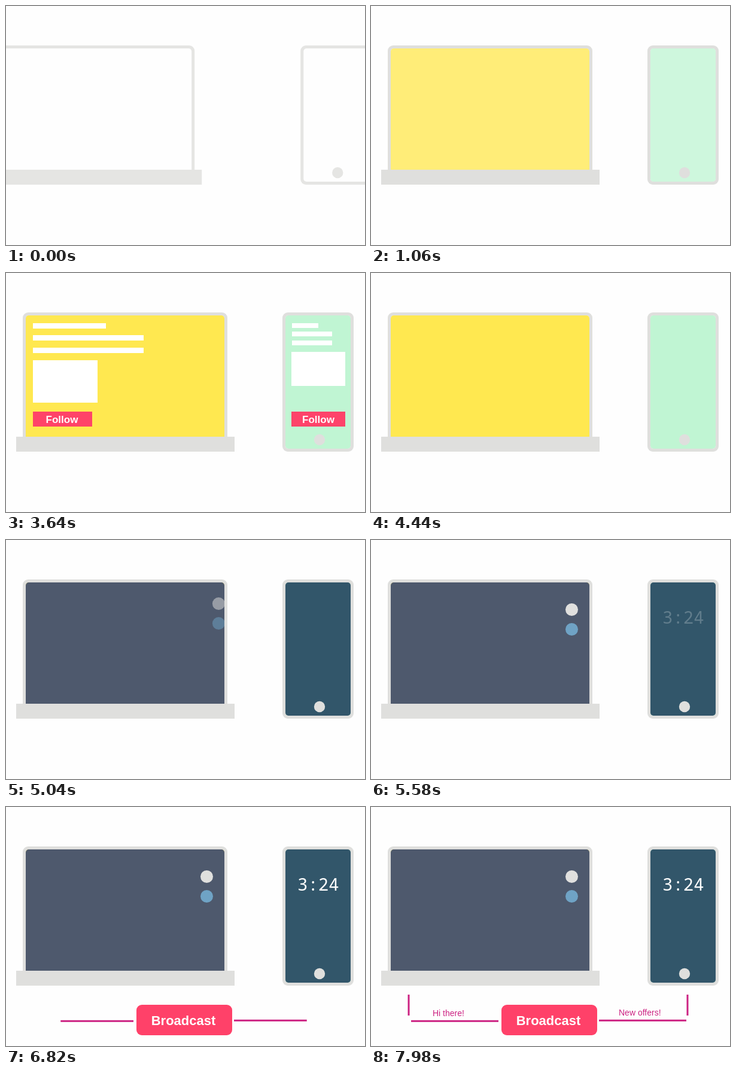
An HTML page with a canvas that plays this animation: 600 by 400 pixels, repeating every 8000 ms.

```html
<!DOCTYPE html>
<html lang="en">
<head>
<meta charset="utf-8">
<title>Devices</title>
<style>
html, body { margin: 0; width: 100%; height: 100%; overflow: hidden; background: #fefefe; }
canvas { display: block; width: 600px; height: 400px; }
</style>
</head>
<body>
<canvas id="stage" width="600" height="400"></canvas>
<script>
const ctx = document.getElementById('stage').getContext('2d');
const LOOP = 8000;
const PAPER = '#fefefe', GREY = '#dfdfdd', PINK = '#ff4169', MAGENTA = '#cc2282';
const SANS = '"Liberation Sans", Arial, sans-serif';
const MONO = '"Noto Sans Mono", "DejaVu Sans Mono", monospace';

const laptop = {
  inner: [33, 71, 332, 203, [5, 5, 0, 0]],
  day: '#ffe850', night: '#4e596d',
  blocks: [[45, 84, 122, 9], [45, 104, 185, 9], [45, 125, 185, 9], [45, 146, 108, 71]],
  button: [45, 232, 99, 25], label: 93.5
};
const phone = {
  inner: [467, 71, 109, 223, 5],
  day: '#c0f5d3', night: '#32566a',
  blocks: [[478, 84, 44, 8], [478, 98, 67, 8], [478, 113, 67, 8], [477, 132, 90, 57]],
  button: [477, 232, 90, 25], label: 522
};

const ramp = (t, from, to) => Math.min(1, Math.max(0, (t - from) / (to - from)));
const smooth = (t, from, to) => {
  const p = ramp(t, from, to);
  return p * p * (3 - 2 * p);
};
const easeOut = (t, from, to) => 1 - (1 - ramp(t, from, to)) ** 3;

function rect(x, y, w, h, color, alpha = 1) {
  ctx.globalAlpha = alpha;
  ctx.fillStyle = color;
  ctx.fillRect(x, y, w, h);
}

function rounded(x, y, w, h, r, color, alpha = 1) {
  ctx.globalAlpha = alpha;
  ctx.fillStyle = color;
  ctx.beginPath();
  ctx.roundRect(x, y, w, h, r);
  ctx.fill();
}

function disc(x, y, r, color, alpha = 1) {
  ctx.globalAlpha = alpha;
  ctx.fillStyle = color;
  ctx.beginPath();
  ctx.arc(x, y, r, 0, Math.PI * 2);
  ctx.fill();
}

function text(str, x, y, font, color, alpha, align = 'center') {
  ctx.globalAlpha = alpha;
  ctx.fillStyle = color;
  ctx.font = font;
  ctx.textAlign = align;
  ctx.fillText(str, x, y);
}

function screen(device, t) {
  rounded(...device.inner, PAPER);
  rounded(...device.inner, device.day, smooth(t, 600, 1270));
  rounded(...device.inner, device.night, smooth(t, 4620, 5000));
}

function content(device, t) {
  const out = 1 - smooth(t, 3840, 4440);
  const show = i => out * smooth(t, 1400 + i * 440, 1920 + i * 440);
  device.blocks.forEach((b, i) => rect(...b, '#fff', show(i)));
  rect(...device.button, PINK, show(4));
  text('Follow', device.label, 251, 'bold 17px ' + SANS, '#fff', show(4));
}

function chatDots(t) {
  const p = smooth(t, 4790, 5290);
  const dx = 40 * (1 - p), dy = -20 * (1 - p);
  ctx.save();
  ctx.beginPath();
  ctx.roundRect(...laptop.inner);
  ctx.clip();
  disc(335.5 + dx, 116.5 + dy, 10.5, '#e0e0de', p);
  disc(335.5 + dx, 149.5 + dy, 10.5, '#6fa3c5', p);
  ctx.restore();
}

function drawLaptop(t, slide) {
  ctx.save();
  ctx.translate(-290 * (1 - slide), 0);
  rounded(28, 66, 342, 208, [9, 9, 0, 0], GREY, slide);
  screen(laptop, t);
  rect(17, 274, 365, 25, GREY, slide);
  content(laptop, t);
  chatDots(t);
  ctx.restore();
}

function drawPhone(t, slide) {
  ctx.save();
  ctx.translate(160 * (1 - slide), 0);
  rounded(462, 66, 119, 233, 9, GREY, slide);
  screen(phone, t);
  disc(524, 279, 9.2, GREY, slide);
  content(phone, t);
  text('3:24', 487, 140, '29px ' + MONO, '#fff', smooth(t, 5400, 5980), 'left');
  ctx.restore();
}

function drawBroadcast(t) {
  const alpha = smooth(t, 5860, 6480);
  rounded(218, 331, 160, 51, 9, PINK, alpha);
  text('Broadcast', 296.5, 365, 'bold 22px ' + SANS, '#fff', alpha);

  const across = 146 * smooth(t, 6480, 6940);
  rect(213 - across, 356.8, across, 3, MAGENTA);
  rect(381, 355.8, across, 3, MAGENTA);

  const up = 35 * smooth(t, 7060, 7320);
  rect(61.5, 349 - up, 3, up, MAGENTA);
  rect(527.5, 349 - up, 3, up, MAGENTA);

  const words = smooth(t, 7260, 7620);
  text('Hi there!', 103, 350, '14px ' + SANS, MAGENTA, words, 'left');
  text('New offers!', 414, 349, '14px ' + SANS, MAGENTA, words, 'left');
}

function draw(t) {
  rect(0, 0, 600, 400, PAPER);
  const slide = easeOut(t, -414, 560);
  drawLaptop(t, slide);
  drawPhone(t, slide);
  drawBroadcast(t);
}

const start = performance.now();
function tick() {
  draw((performance.now() - start) % LOOP);
  requestAnimationFrame(tick);
}
tick();
</script>
</body>
</html>
```
